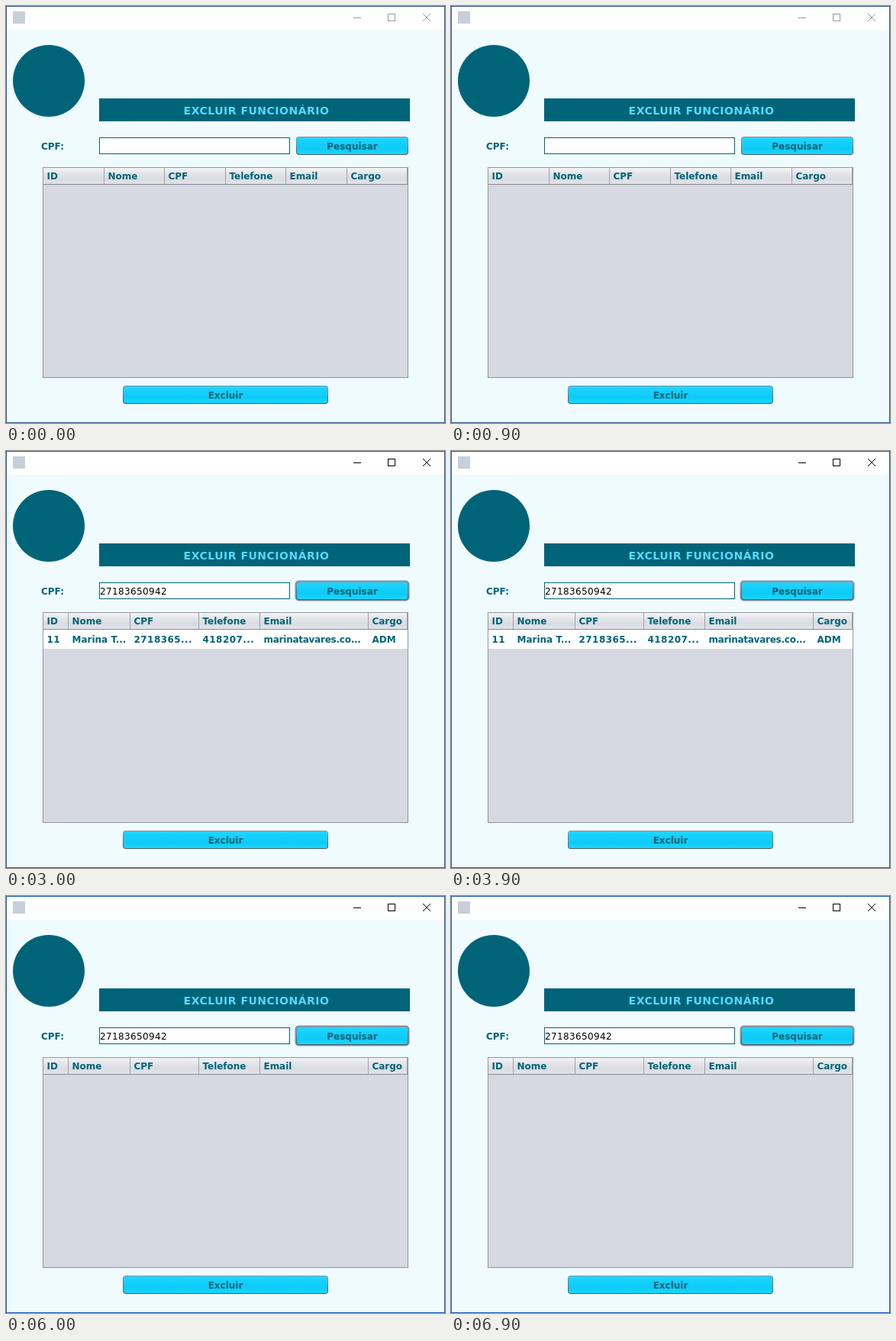
An HTML page with a canvas for the animation above (7500 ms loop, 575x546 px).

```html
<!DOCTYPE html>
<html lang="pt-BR">
<head>
<meta charset="utf-8">
<title>Excluir funcionário</title>
<style>
html, body { margin: 0; width: 100%; height: 100%; overflow: hidden; background: #f0fbff; }
canvas { display: block; }
</style>
</head>
<body>
<canvas id="stage" width="575" height="546"></canvas>
<script>
const ctx = document.getElementById('stage').getContext('2d');
const STEP = 1500;
const TEAL = '#006478';
const BOLD = 'bold 12px "DejaVu Sans", Verdana, sans-serif';
const PLAIN = '12px "DejaVu Sans", Verdana, sans-serif';
const TITLE = 'bold 14px "DejaVu Sans", Verdana, sans-serif';
const HEADS = ['ID', 'Nome', 'CPF', 'Telefone', 'Email', 'Cargo'];

const EVEN = [48, 128, 207, 287, 366, 446];
const LIST = [48, 81, 162, 252, 332, 429];
const FOUND = [48, 81, 162, 252, 332, 474];
const CPF = '27183650942';

const first = email => ['11', 'Marina T...', '2718365...', '418207...', email, 'ADM'];
const second = ['13', 'Diego Fa...', '4061927...', '418653...', 'diegofaro...', 'SUPERVIS...'];

const scenes = [
  { active: false, focus: false, cpf: '', cols: EVEN, rows: [] },
  { active: true, focus: true, cpf: '', cols: LIST, rows: [first('marinatava...'), second] },
  { active: true, focus: true, cpf: CPF, cols: FOUND, rows: [first('marinatavares.co...')] },
  { active: true, focus: false, cpf: CPF, cols: FOUND, rows: [[]], cell: true },
  { active: true, focus: true, cpf: CPF, cols: FOUND, rows: [] }
];

function rect(x, y, w, h, fill) {
  ctx.fillStyle = fill;
  ctx.fillRect(x, y, w, h);
}

function frame(x, y, w, h, color) {
  ctx.strokeStyle = color;
  ctx.lineWidth = 1;
  ctx.strokeRect(x + 0.5, y + 0.5, w - 1, h - 1);
}

function round(x, y, w, h, r, fill) {
  ctx.beginPath();
  ctx.roundRect(x, y, w, h, r);
  ctx.fillStyle = fill;
  ctx.fill();
}

function shade(y, h, stops) {
  const g = ctx.createLinearGradient(0, y, 0, y + h);
  stops.forEach((c, i) => g.addColorStop(i / (stops.length - 1), c));
  return g;
}

function text(str, x, y, { font = BOLD, color = TEAL, align = 'left', track = 0 } = {}) {
  ctx.font = font;
  ctx.fillStyle = color;
  ctx.textAlign = align;
  ctx.letterSpacing = track + 'px';
  ctx.fillText(str, x, y);
}

function button(label, x, y, w, h, focus) {
  if (focus) round(x - 1.5, y - 1.5, w + 3, h + 3, 5, '#8492a8');
  round(x, y, w, h, 4, shade(y, h, ['#8a97a5', '#4d5866']));
  round(x + 1, y + 1, w - 2, h - 2, 3, shade(y, h, ['#27d6ff', '#14d0fc', '#0dcbf6', '#1fd9ff']));
  text(label, x + w / 2, y + 17, { align: 'center' });
}

function titleBar(active) {
  rect(0, 0, 575, 31, '#fff');
  rect(9, 7, 16, 16, '#c6cfdb');
  const ink = active ? '#000' : '#999';
  rect(455, 15, 10, 1, ink);
  frame(500, 10, 10, 10, ink);
  ctx.beginPath();
  ctx.moveTo(546, 10);
  ctx.lineTo(556, 20);
  ctx.moveTo(556, 10);
  ctx.lineTo(546, 20);
  ctx.stroke();
}

function table({ cols, rows, cell }) {
  rect(48, 211, 479, 276, '#d6d9e1');
  rect(49, 212, 477, 21, shade(212, 21, ['#f3f4f6', '#e5e6e9', '#dadce1', '#e2e4e9']));
  cols.forEach((x, i) => {
    const edge = cols[i + 1] || 525;
    rect(edge, 212, 1, 21, '#9ba0aa');
    text(HEADS[i], x + 5.5, 227, { track: -0.05 });
  });
  rows.forEach((row, r) => {
    const y = 234 + r * 25;
    rect(49, y, 477, 25, r % 2 ? '#f2f2f2' : '#fff');
    row.forEach((str, i) => {
      const track = /^\d/.test(str) ? 0.45 : i === 4 ? -0.25 : 0;
      text(str, cols[i] + 5.5, y + 17, { track });
    });
  });
  rect(48, 233, 479, 1, '#858a95');
  frame(48, 211, 479, 276, '#9297a1');
  if (cell) frame(49, 234, 33, 25, '#73a4d1');
}

function draw(s) {
  rect(0, 0, 575, 546, '#f0fbff');
  titleBar(s.active);
  frame(0, 0, 575, 546, s.active ? '#1b5cb8' : '#34588f');

  ctx.beginPath();
  ctx.arc(56, 98, 47, 0, Math.PI * 2);
  ctx.fillStyle = TEAL;
  ctx.fill();

  rect(122, 121, 407, 30, TEAL);
  text('EXCLUIR FUNCIONÁRIO', 328, 142, { font: TITLE, color: '#58d8fc', align: 'center', track: 0.5 });

  text('CPF:', 46, 188);
  rect(122, 172, 250, 22, '#fff');
  frame(122, 172, 250, 22, TEAL);
  text(s.cpf, 123, 188, { font: PLAIN, color: '#000', track: 0.36 });

  button('Pesquisar', 380, 171, 147, 24, s.focus);
  table(s);
  button('Excluir', 153, 497, 269, 24, false);
}

function tick() {
  draw(scenes[Math.floor(performance.now() / STEP) % scenes.length]);
  requestAnimationFrame(tick);
}
tick();
</script>
</body>
</html>
```
